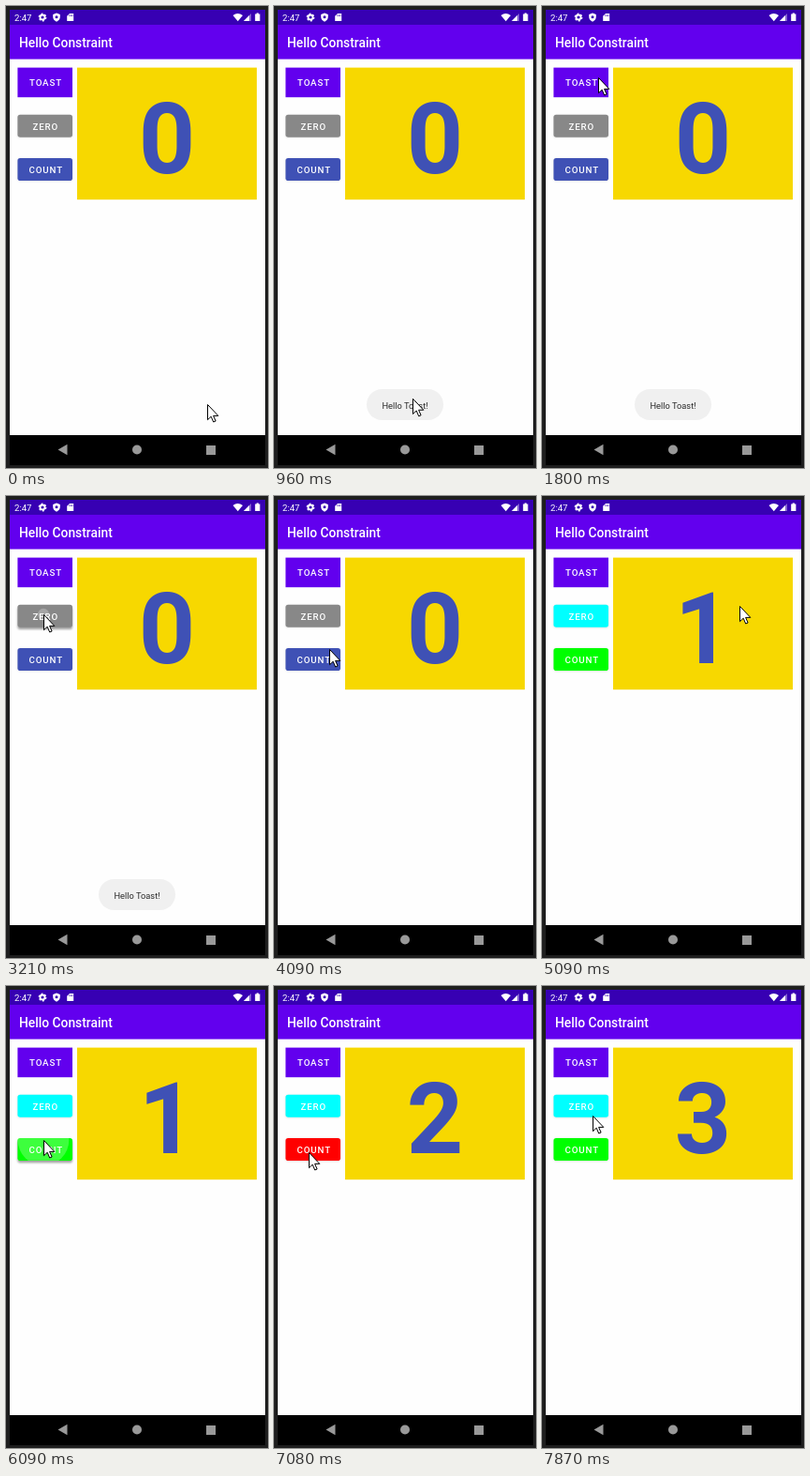
These frames come from a looping animation (280x492 px, 7990 ms). An HTML page:

```html
<!DOCTYPE html>
<html lang="en">
<head>
<meta charset="utf-8">
<title>Hello Constraint</title>
<style>
html, body { margin: 0; width: 100%; height: 100%; overflow: hidden; background: #1e1e1e; }
svg { display: block; width: 280px; height: 492px; font-family: Roboto, sans-serif; }
.label { font-size: 9.73px; font-weight: 500; letter-spacing: .0893em; fill: #fff; }
</style>
</head>
<body>
<svg viewBox="0 0 280 492">
  <defs>
    <filter id="blur" x="-20%" y="-40%" width="140%" height="180%"><feGaussianBlur stdDeviation="1.2"/></filter>
  </defs>

  <rect x="4" y="4" width="273" height="485" fill="#fefefe"/>
  <rect x="4" y="4" width="273" height="16" fill="#3700b3"/>
  <rect x="4" y="20" width="273" height="36.6" fill="#6200ee"/>
  <text x="14" y="43.5" font-size="13.8" font-weight="500" fill="#fff">Hello Constraint</text>

  <!-- status icons -->
  <g fill="#fff">
    <text x="9" y="15.5" font-size="9.6">2:47</text>
    <g fill="none" stroke="#fff">
      <circle cx="39" cy="12" r="2.5" stroke-width="1.8"/>
      <circle cx="39" cy="12" r="3.8" stroke-width="1.2" stroke-dasharray="2 1.98"/>
    </g>
    <path d="M54 7.5l3.8 1.6v2.7c0 2.3-1.6 4-3.8 4.9-2.2-.9-3.8-2.6-3.8-4.9V9.1z"/>
    <circle cx="54" cy="11.8" r="1.5" fill="#3700b3"/>
    <path d="M68 8h4.2v8h-7v-5.3z"/>
    <path d="M67.8 9.3v1.8m1.6-1.8v1.8m1.5-1.8v1.8" stroke="#3700b3" stroke-width=".7"/>
    <path d="M242.5 10q5-4 10.5 0l-5.2 6.3z"/>
    <path d="M262 8v8h-8z" opacity=".4"/>
    <path d="M260 10v6h-6z"/>
    <path d="M267.7 7.6h2.2v.9h1.5v7.6h-5.2V8.5h1.5z"/>
  </g>

  <rect x="76" y="65.6" width="192" height="140.6" fill="#f7d800"/>
  <text id="digit" x="172" y="177.7" font-size="105.5" font-weight="700" text-anchor="middle" fill="#3f51b5"></text>

  <rect x="12.4" y="65.6" width="58.6" height="31.6" fill="#6200ee"/>
  <text class="label" x="25" y="85">TOAST</text>
  <g id="buttons"></g>

  <g id="toast">
    <rect x="99" y="408" width="82" height="33" rx="16.5" fill="#f0f0f0"/>
    <text x="140" y="428.5" font-size="9.3" text-anchor="middle" fill="#2b2b2b">Hello Toast!</text>
  </g>

  <!-- navigation bar -->
  <rect x="4" y="457" width="273" height="32"/>
  <g fill="#999">
    <path d="M55.5 472.5l10-5.8v11.6z"/>
    <circle cx="140" cy="472.5" r="5"/>
    <rect x="214" y="468" width="10" height="10"/>
  </g>

  <path id="cursor" d="M.5 .5v16.2l3.7-3.5 2.5 5.8 2.4-1-2.5-5.6h5.2z" fill="#fff" stroke="#000"/>
</svg>
<script>
const LOOP = 7990, PRESS = 430;
const start = [215, 424];
// pointer moves: leave, arrive, x, y, sideways bow
const moves = [
  [0, 1080, 146, 415, -24],
  [1200, 1800, 60, 76],
  [1950, 2280, 40, 126],
  [3650, 4090, 59, 163],
  [4210, 4360, 48, 168],
  [4780, 5090, 211, 117],
  [5210, 5950, 40, 164, -58],
  [6300, 6630, 103, 157],
  [6630, 7080, 37, 177],
  [7600, 7870, 54, 138]
];
const zeroPress = [3210], countPress = [4600, 5950, 7360];
const COUNT_DELAY = 200;

const $ = id => document.getElementById(id);
const clamp = v => Math.max(0, Math.min(1, v));
const ease = p => p * p * (3 - 2 * p);

function pointer(t) {
  let [x, y] = start;
  for (const [leave, arrive, toX, toY, bow = 0] of moves) {
    if (t < leave) break;
    const p = ease(clamp((t - leave) / (arrive - leave)));
    const dx = toX - x, dy = toY - y;
    const side = bow * Math.sin(Math.PI * p) / Math.hypot(dx, dy);
    x += dx * p - dy * side;
    y += dy * p + dx * side;
  }
  return [x, y];
}

// Adds a button and returns the function that draws it
function button(text, x, y, presses) {
  const box = `x="12.4" y="${y}" width="58.6" height="24" rx="2.8"`;
  $('buttons').insertAdjacentHTML('beforeend', `<g>
    <clipPath id="clip${text}"><rect ${box}/></clipPath>
    <rect ${box} filter="url(#blur)"/>
    <rect ${box}/>
    <g clip-path="url(#clip${text})"><circle fill="#fff"/></g>
    <text class="label" x="${x}" y="${y + 15.7}">${text}</text>
  </g>`);
  const group = $('buttons').lastElementChild;
  const [shadow, face] = group.querySelectorAll(':scope > rect');
  const ripple = group.querySelector('circle');

  return (t, color) => {
    const pressed = presses.find(s => t >= s && t < s + PRESS);
    const p = pressed === undefined ? 1 : (t - pressed) / PRESS;
    const strength = clamp((1 - p) / .4);
    const [cx, cy] = pointer(t);
    face.setAttribute('fill', color);
    shadow.setAttribute('opacity', .12 + .25 * strength);
    shadow.setAttribute('transform', `translate(0 ${.4 + 1.8 * strength})`);
    ripple.setAttribute('transform', `translate(${cx} ${cy}) scale(${6 + 65 * p})`);
    ripple.setAttribute('r', 1);
    ripple.setAttribute('opacity', .24 * strength);
  };
}

const drawZero = button('ZERO', 28.5, 115.8, zeroPress);
const drawCount = button('COUNT', 24.5, 162, countPress);

function draw(t) {
  const n = countPress.filter(s => t >= s + COUNT_DELAY).length;
  $('digit').textContent = n;
  drawZero(t, n ? '#0ff' : '#888');
  drawCount(t, !n ? '#3f51b5' : n % 2 ? '#0f0' : '#f00');
  $('toast').setAttribute('opacity', Math.min(clamp((t - 240) / 180), clamp((3650 - t) / 250)));
  $('cursor').setAttribute('transform', `translate(${pointer(t)})`);
}

const origin = performance.now();
function tick() {
  draw((performance.now() - origin) % LOOP);
  requestAnimationFrame(tick);
}
tick();
</script>
</body>
</html>
```
